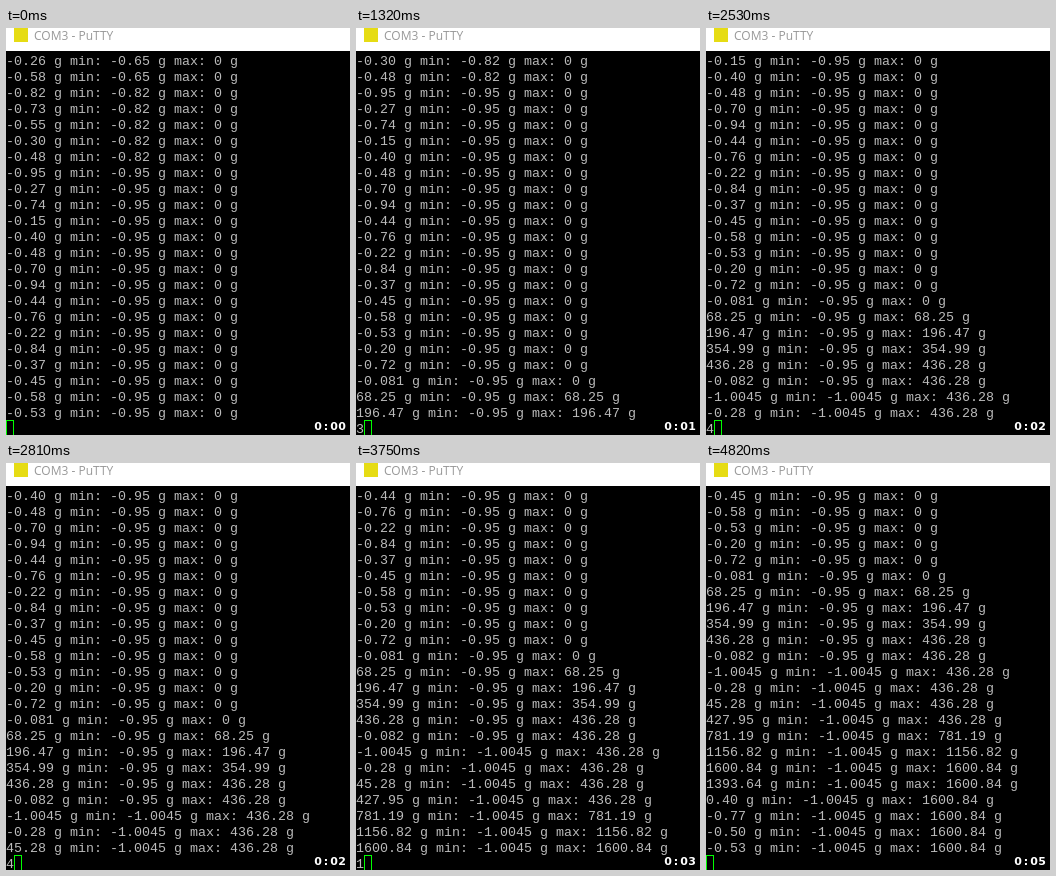
An HTML page with a canvas that plays this animation: 344x407 px, repeating every 4.92 s.

```html
<!DOCTYPE html>
<html lang="en">
<head>
<meta charset="utf-8">
<title>Serial terminal</title>
<style>
  html, body { margin: 0; width: 100%; height: 100%; overflow: hidden; background: #000; }
  canvas { display: block; width: 344px; height: 407px; }
</style>
</head>
<body>
<canvas id="stage" width="344" height="407"></canvas>
<script>
const ctx = document.getElementById('stage').getContext('2d');
const LOOP = 4920, ROWS = 23, TOP = 24, ROW_H = 16, COL_W = 8;

// A line completes every PERIOD ms; its first character shows TYPING ms earlier.
const FIRST_LINE = 142, PERIOD = 243, TYPING = 45, CLOCK_SECOND = 962;

const log = `-0.26 -0.58 -0.82 -0.73 -0.55 -0.30 -0.48 -0.95 -0.27 -0.74 -0.15
  -0.40 -0.48 -0.70 -0.94 -0.44 -0.76 -0.22 -0.84 -0.37 -0.45 -0.58 -0.53 -0.20
  -0.72 -0.081 68.25 196.47 354.99 436.28 -0.082 -1.0045 -0.28 45.28 427.95
  781.19 1156.82 1600.84 1393.64 0.40 -0.77 -0.50 -0.53`;

// Running extremes carried over from earlier readings.
let min = '-0.65', max = '0';
const lines = log.split(/\s+/).map(v => {
  if (+v < +min) min = v;
  if (+v > +max) max = v;
  return `${v} g min: ${min} g max: ${max} g`;
});

const linesBy = t =>
  Math.min(lines.length - ROWS, Math.floor((t - FIRST_LINE) / PERIOD) + 1);

function text(str, x, y, font, color, align = 'left') {
  ctx.font = font;
  ctx.fillStyle = color;
  ctx.textAlign = align;
  ctx.fillText(str, x, y);
}

function drawTitle() {
  ctx.fillStyle = '#fff';
  ctx.fillRect(0, 0, 344, 23);
  ctx.fillStyle = '#e6dc14';
  ctx.fillRect(8, 0, 14, 14);
  text('COM3 - PuTTY', 28, 12, '12px "Open Sans", "Noto Sans", sans-serif', '#999');
}

function drawTerminal(t) {
  const mono = '13.333px "Liberation Mono", "Courier New", monospace';
  const first = linesBy(t);
  const next = first + ROWS;
  const typed = linesBy(t + TYPING) > first ? lines[next][0] : '';
  const row = (str, i) => text(str, 0, TOP + i * ROW_H + 13, mono, '#bbb');
  lines.slice(first, next).forEach(row);
  row(typed, ROWS);
  ctx.strokeStyle = '#0f0';
  ctx.lineWidth = 1;
  ctx.strokeRect(typed.length * COL_W + 0.5, TOP + ROWS * ROW_H + 0.5, COL_W - 1, ROW_H - 1);
}

function drawClock(t) {
  const label = '0:0' + Math.floor(t / CLOCK_SECOND);
  [...label].forEach((c, i) =>
    text(c, 312 + i * COL_W, 402, 'bold 11px "DejaVu Sans", sans-serif', '#fff', 'center'));
}

function frame() {
  const t = performance.now() % LOOP;
  ctx.fillStyle = '#000';
  ctx.fillRect(0, 0, 344, 407);
  drawTitle();
  drawTerminal(t);
  drawClock(t);
  requestAnimationFrame(frame);
}
frame();
</script>
</body>
</html>
```
